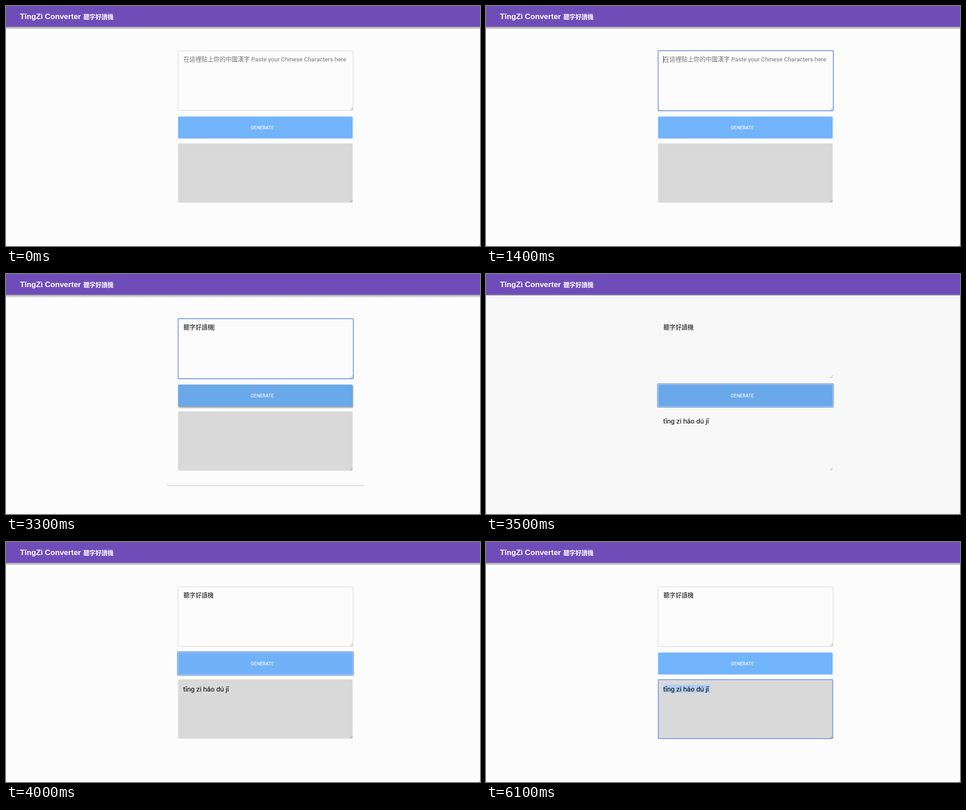
An HTML page that plays this animation: 1051 by 533 pixels, repeating every 6.3 s.

```html
<!DOCTYPE html>
<html lang="zh-Hant">
<head>
<meta charset="utf-8">
<title>Text converter</title>
<style>
  html, body { margin: 0; width: 100%; height: 100%; overflow: hidden; background: #fcfcfc; }
  svg { display: block; width: 100vw; height: 100vh; }
  text { font-family: Roboto, "Noto Sans CJK TC", "Noto Sans CJK", sans-serif; white-space: pre; }
  .cjk { font-family: "Noto Sans CJK TC", "Noto Sans CJK", sans-serif; font-size: 13.36px; }
  .title { font-family: "Liberation Sans", Arial, sans-serif; font-size: 16.9px; }
  .title, .cjk.bold { font-weight: 700; fill: #fff; }
  .label { font-family: Inter, Roboto, sans-serif; font-size: 9.8px; font-weight: 500; fill: #fff; }
  .hint { fill: #757575; }
  .ring { fill: none; stroke: #84a3ec; stroke-width: 2.2; }
  .grip { fill: none; stroke: #858585; stroke-width: .8; }
</style>
</head>
<body>
<svg viewBox="0 0 1051 533" preserveAspectRatio="none">
  <defs>
    <linearGradient id="shade" gradientUnits="userSpaceOnUse" x1="0" x2="0" y1="46" y2="51">
      <stop offset="0" stop-color="#9d9b9f"/>
      <stop offset=".4" stop-color="#b9b8ba"/>
      <stop offset="1" stop-color="#dadada"/>
    </linearGradient>
    <linearGradient id="softShade" gradientUnits="userSpaceOnUse" x1="0" x2="0" y1="46" y2="53">
      <stop offset="0" stop-color="#9d9b9f"/>
      <stop offset=".5" stop-color="#cfcfcf"/>
      <stop offset="1" stop-color="#fcfcfc"/>
    </linearGradient>
    <filter id="blur" x="-5%" y="-20%" width="110%" height="140%">
      <feGaussianBlur stdDeviation="1.3"/>
    </filter>
  </defs>

  <rect id="page" width="1051" height="533"/>
  <path d="M0 530V533H3Q0 533 0 530M1051 530V533H1048Q1051 533 1051 530" fill="#777"/>

  <rect id="barShade" y="46" width="1051"/>
  <rect width="1051" height="46" fill="#6f4db9"/>
  <text class="title" x="31" y="28.5">TīngZì Converter</text>
  <text class="cjk bold" x="171.7" y="28.5">聽字好讀機</text>

  <path id="cardShade" d="M355 468H796Q793 471.5 788 471.5H363Q358 471.5 355 468Z" fill="#e4e4e4"/>

  <rect id="inputBox" x="381.5" y="99.5" width="388" height="132.3" rx="2" fill="#fcfcfc" stroke="#d0d0d0"/>
  <rect id="inputRing" class="ring" x="381.7" y="99.2" width="388.5" height="133.4" rx="2"/>
  <g id="placeholder">
    <text class="cjk hint" x="393.5" y="123.2">在這裡貼上你的中國漢字</text>
    <text class="hint" x="544" y="123.2" font-size="13.3">Paste your Chinese Characters here</text>
  </g>
  <text id="inputText" class="cjk" x="393.5" y="123.2" fill="#111">聽字好讀機</text>
  <rect id="caret" y="111" width="1" height="15.5" fill="#111"/>
  <path class="grip" d="M763 231.2l6-6m-3 6l3-3"/>

  <rect id="buttonShade" x="382.5" y="248" width="387.5" height="49.5" rx="2" fill="#777" filter="url(#blur)"/>
  <rect id="button" x="381.5" y="245.4" width="387.2" height="48.8" rx="1.5"/>
  <g id="buttonRing">
    <rect id="buttonEdge" class="ring" x="380.4" y="243.9" width="389.8" height="52.1" rx="2"/>
    <rect x="382.1" y="245.6" width="386.4" height="48.7" rx="1" fill="none" stroke="#a5c6f4" stroke-width="1"/>
  </g>
  <text class="label" x="568.2" y="273.8" text-anchor="middle">GENERATE</text>

  <rect id="outputBox" x="381.5" y="305.3" width="387.2" height="131.4" rx="2" fill="#d9d9d9"/>
  <rect id="outputRing" class="ring" x="382" y="305.6" width="386.8" height="131" rx="2"/>
  <rect id="selection" x="393" y="317" height="18" fill="#afcdf4"/>
  <text id="outputText" x="392.7" y="331.5" font-size="15.2" fill="#000">tīng zì hǎo dú jī</text>
  <path class="grip" d="M762.2 436.2l6-6m-3 6l3-3"/>
</svg>
<script>
  const LOOP = 6300, STEP = 100;
  const FOCUS = 1100, PASTE = 1800, CLICK = 3400, RESULT = 3500, SELECT = 5000;
  const el = {};
  document.querySelectorAll('svg [id]').forEach(node => { el[node.id] = node; });

  const clamp = v => Math.max(0, Math.min(1, v));
  const ramp = (t, from, to) => clamp((t - from) / (to - from));
  const within = (t, from, to) => t >= from && t < to;
  const show = (name, on) => el[name].setAttribute('opacity', Number(on));
  const mix = (a, b, k) => `rgb(${a.map((v, i) => Math.round(v + (b[i] - v) * k))})`;

  function draw(t) {
    const flash = within(t, RESULT, 3700);
    const hover = ramp(t, 2600, 2900) * (1 - ramp(t, 3700, 4100));
    const raised = within(t, 2700, RESULT);
    const focused = within(t, FOCUS, CLICK);
    const pasted = t >= PASTE;

    el.page.setAttribute('fill', flash ? '#f8f8f8' : '#fcfcfc');
    el.barShade.setAttribute('height', flash ? 2 : raised ? 7 : 5);
    el.barShade.setAttribute('fill', raised ? 'url(#softShade)' : 'url(#shade)');
    show('cardShade', raised);

    show('inputBox', !flash);
    show('inputRing', focused);
    show('placeholder', !pasted);
    show('inputText', pasted);
    const blink = (t - (pasted ? PASTE : FOCUS)) % 1000 < 500;
    show('caret', focused && (blink || t >= 3200));
    el.caret.setAttribute('x', pasted ? 460.5 : 393);

    el.button.setAttribute('fill', mix([114, 180, 251], [105, 168, 233], hover));
    show('buttonShade', t < CLICK ? hover * .6 : 0);
    show('buttonRing', within(t, CLICK, SELECT));
    el.buttonEdge.style.stroke = mix([132, 163, 236], [140, 174, 232], hover);

    show('outputBox', !flash);
    show('outputText', t >= RESULT);
    show('outputRing', t >= SELECT);
    el.selection.setAttribute('width', Math.max(0, Math.min(104, (t - SELECT) * .32)));
  }

  const start = performance.now();
  function tick() {
    const t = (performance.now() - start) % LOOP;
    draw(Math.floor(t / STEP) * STEP);
    requestAnimationFrame(tick);
  }
  tick();
</script>
</body>
</html>
```
